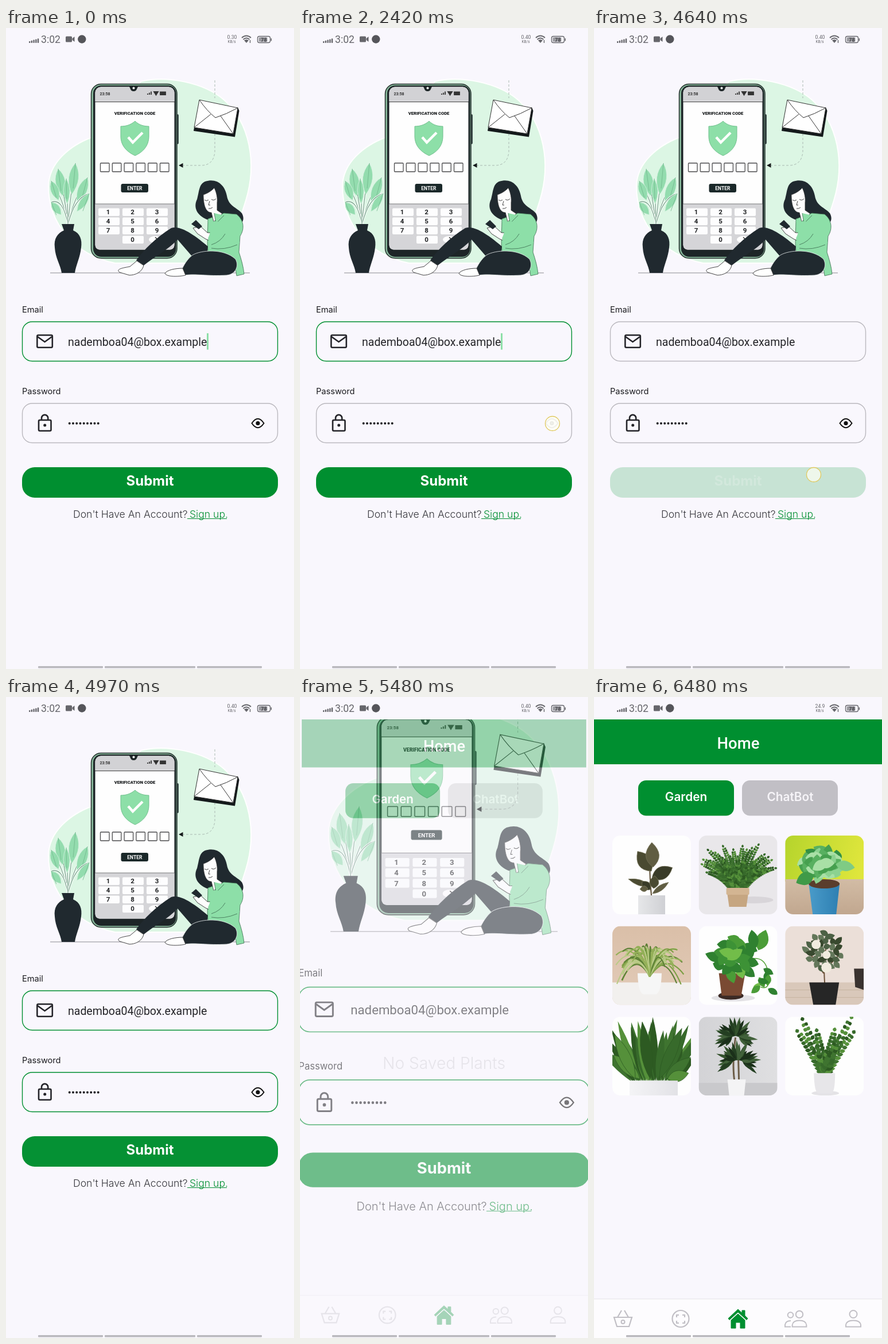
These frames come from a looping animation (502x1115 px, 6670 ms). An HTML page with a canvas:

```html
<!DOCTYPE html>
<html lang="en">
<head>
<meta charset="utf-8">
<title>Plant app login</title>
<style>
html, body { margin: 0; width: 100%; height: 100%; overflow: hidden; background: #f9f7fd; }
canvas { display: block; width: 100vw; height: 100vh; }
</style>
</head>
<body>
<canvas id="stage"></canvas>
<script>
const W = 502, H = 1115, LOOP = 6670;
const BG = '#f9f7fd', GREEN = '#008f30', GRAY = '#c1bfc5', DARK = '#20292f', MINT = '#8ddfa8';
const UI = 'Inter, sans-serif', ROBOTO = 'Roboto, sans-serif';
const EMAIL = 'nademboa04@box.example', PASSWORD = '@dome123$';

const dpr = Math.max(1, window.devicePixelRatio || 1);
const stage = document.getElementById('stage');
const buffer = document.createElement('canvas');
for (const c of [stage, buffer]) { c.width = W * dpr; c.height = H * dpr; }
const main = stage.getContext('2d'), layer = buffer.getContext('2d');
let g = main;

// ---- helpers ----
const clamp = v => Math.min(1, Math.max(0, v));

function paint(p, fill, stroke, lw = 1) {
  if (fill) { g.fillStyle = fill; g.fill(p); }
  if (stroke) { g.strokeStyle = stroke; g.lineWidth = lw; g.stroke(p); }
}
const path = (d, fill, stroke, lw) => paint(new Path2D(d), fill, stroke, lw);
function box(x, y, w, h, r, fill, stroke, lw) {
  const p = new Path2D();
  p.roundRect(x, y, w, h, r);
  paint(p, fill, stroke, lw);
}
function disc(x, y, r, fill, stroke, lw) {
  const p = new Path2D();
  p.arc(x, y, r, 0, 7);
  paint(p, fill, stroke, lw);
}
function oval(x, y, rx, ry, fill) {
  const p = new Path2D();
  p.ellipse(x, y, rx, ry, 0, 0, 7);
  paint(p, fill);
}
function text(s, x, y, font, fill, align = 'left') {
  g.font = font;
  g.fillStyle = fill;
  g.textAlign = align;
  g.fillText(s, x, y);
}
function blend(x0, y0, x1, y1, from, to) {
  const f = g.createLinearGradient(x0, y0, x1, y1);
  f.addColorStop(0, from);
  f.addColorStop(1, to);
  return f;
}
// Cubic bezier easing (0.35, 0.45, 0, 1)
function ease(x) {
  let lo = 0, hi = 1, s = 0.5;
  for (let i = 0; i < 24; i++) {
    s = (lo + hi) / 2;
    if (1.05 * s * (1 - s) ** 2 + s ** 3 < x) lo = s; else hi = s;
  }
  return 1.35 * s * (1 - s) ** 2 + 3 * s * s * (1 - s) + s ** 3;
}
// Opacity of a touched control: drops at once, then eases back
function pressed(t, down, up) {
  if (t < down) return 1;
  const k = clamp((t - up) / 250);
  return 0.2 + 0.8 * k * (2 - k);
}

let seed = 1;
const rnd = () => (seed = seed * 16807 % 2147483647) / 2147483647;
const pick = list => list[Math.floor(rnd() * list.length)];

// ---- foliage; angles are degrees clockwise from straight up ----
function leaf(x, y, deg, len, w, fill, stroke) {
  const a = deg * Math.PI / 180, dx = Math.sin(a), dy = -Math.cos(a);
  const mx = x + dx * len * 0.45, my = y + dy * len * 0.45;
  const p = new Path2D();
  p.moveTo(x, y);
  p.quadraticCurveTo(mx - dy * w, my + dx * w, x + dx * len, y + dy * len);
  p.quadraticCurveTo(mx + dy * w, my - dx * w, x, y);
  paint(p, fill, stroke, 0.8);
}
function tuft(x, y, n, spread, len, w, cols, foot = 0) {
  for (let i = 0; i < n; i++) {
    const u = (i * 7 % n) / (n - 1) * 2 - 1;
    leaf(x + u * foot, y, u * spread + rnd() * 16 - 8, len * (0.5 + 0.5 * rnd()), w, pick(cols));
  }
}
// Leaves spread evenly over an oval, pointing loosely outwards
function scatter(n, x, y, rx, ry, len, w, cols) {
  for (let i = 0; i < n; i++) {
    const out = i * 137.5, b = out * Math.PI / 180, r = Math.sqrt((n - i) / n);
    const deg = out + rnd() * 130 - 65, a = deg * Math.PI / 180, l = len * (0.7 + 0.4 * rnd());
    leaf(x + Math.sin(b) * rx * r - Math.sin(a) * l / 2,
      y - Math.cos(b) * ry * r + Math.cos(a) * l / 2, deg, l, w, pick(cols));
  }
}
function frond(x, y, deg, len, n, size, w, bend, cols) {
  for (let i = 0; i < n; i++) {
    const a = deg * Math.PI / 180, s = size * (1 - 0.6 * i / n);
    leaf(x, y, deg - 50, s, w, pick(cols));
    leaf(x, y, deg + 50, s, w, pick(cols));
    x += Math.sin(a) * len / n;
    y -= Math.cos(a) * len / n;
    deg += bend / n;
  }
  leaf(x, y, deg, size * 0.5, w, pick(cols));
}

// ---- login illustration ----
function drawPhone() {
  box(297, 150, 4, 52, 2, '#3a4a48');
  box(148.5, 97.5, 149.5, 303, 17, '#86b79a', '#27312f', 1.5);
  box(152, 100, 144.5, 298, 14, '#1d2527');
  box(155.5, 102.5, 138, 283, [10, 10, 8, 8], '#fefefe');
  box(155.5, 102.5, 138, 25, [10, 10, 0, 0], '#d2d2d5');
  path('M155 128.5H294', null, '#333', 1.2);
  path('M214 101H231C228 103 229 110 222.500 110C216 110 217 103 214 101Z', '#1d2527');
  disc(222.5, 104.5, 2, '#fff');
  text('23:58', 163.5, 116.5, `bold 7px ${ROBOTO}`, '#333');
  path('M247 116V114M250 116V112.500M253 116V110.500M258 111H265L261.500 116.500ZM269 111.500H278V116H269Z', '#333', '#333', 1.8);
  text('VERIFICATION CODE', 224.5, 151, `900 7.6px ${ROBOTO}`, '#16191b', 'center');
  path('M225 162C217 169 208 171 200 171V188C200 206 212 216 225 222C238 216 249 206 249 188V171C241 171 232 169 225 162Z', MINT, '#6fbf8c', 1);
  path('M213 190L221 199L238 182', null, '#fff', 4.5);
  for (let i = 0; i < 6; i++) box(164.5 + i * 20.8, 235, 15.5, 15, 1, '#fff', '#4a4a4c', 1.3);
  box(200.5, 271, 47.5, 15, 3, '#1a2829');
  text('ENTER', 224.3, 282, `bold 8.500px ${ROBOTO}`, '#fff', 'center');
  box(155.5, 306, 138, 79.5, [0, 0, 8, 8], '#d5d5d8');
  path('M155 306H294', null, '#77787b', 1);
  for (let i = 0; i < 10; i++) {
    const col = i < 9 ? i % 3 : 1, y = 313.5 + Math.floor(i / 3) * 16;
    box(161 + col * 42, y, 37, 13.5, 2, '#fdfdfe');
    text((i + 1) % 10, 178 + col * 42.5, y + 10.8, `bold 11.5px ${ROBOTO}`, '#202224', 'center');
  }
  oval(260, 368, 11, 6, '#fff');
  path('M260 364L268 371M268 364L262 371', null, '#222', 1.4);
}

function drawMail() {
  g.setLineDash([4, 3]);
  path('M364 91V122M364 184V215Q362 239 340 239H309', null, '#a9b9b1', 1);
  g.setLineDash([]);
  path('M301 239L308.500 235V243Z', '#151a1b');
  path('M404 138L406.500 144L399 189.500L327 179L328 173Z', '#14191b');
  path('M337 125L404 139L396 184L328 173Z', '#fff', '#333', 1);
  path('M328 173L357 150M396 184L374 153M337 125Q350 144 365 156Q384 150 404 139', null, '#333', 1);
}

function drawVase() {
  const tips = [[121, 235, 55, 17], [91, 245, 48, 17], [79, 266, 36, 14], [142, 260, 48, 16],
    [145, 288, 38, 12], [79, 303, 28, 13], [105, 262, 44, 11]];
  for (const [x, y, len, w] of tips) {
    const deg = Math.atan2(108 - x, 335 - y) * 180 / Math.PI;
    const stem = `M108 342Q${108 + (x - 108) * 0.3} 295 ${x} ${y}`;
    path(stem, null, '#fff', 3);
    path(stem, null, '#64967a', 1.1);
    leaf(x, y, 180 - deg * 0.9, len, w, '#93dcae', '#d9f2e2');
    path(`M${x} ${y}L${x + (108 - x) * 0.3} ${y + len * 0.8}`, null, '#6fb58b', 0.8);
  }
  path('M97 341H119L117 352C129 357 133 368 131 382C129 400 122 412 120 426H97C95 412 86 400 85 382C83 366 90 357 101 352Z', DARK);
}

function drawReader() {
  path('M347 267C368 260 382 274 385 292C388 310 402 312 411 322C418 334 410 345 402 338L350 333C333 326 326 312 333 298C337 284 336 272 347 267Z', DARK);
  path('M352 332L380 322L402 324C415 334 416 350 408 362L406 390C410 402 414 416 415 428L402 431L398 405L352 388C350 370 352 350 352 332Z', MINT, '#3d6b50', 0.8);
  path('M344 290C351 288 360 282 363 278C367 286 369 296 368 304V317L377 323L362 337L358 321C350 321 344 312 344 290Z', '#fdfdfd', '#333', 0.8);
  path('M346 299Q349 302 353 299M358 298Q362 301 366 297M355 301L353 308H356M353 314Q357 315 360 312', null, '#333', 0.9);
  path('M363 322L366 340L380 326', MINT, '#3d6b50', 0.8);
  path('M288 348C301 344 320 353 352 380L350 397L325 398L299 368C282 386 260 397 240 413L227 404C240 386 262 364 288 348Z', DARK);
  path('M400 402C380 383 340 386 325 395C316 402 310 412 305 423L312 430C330 427 350 432 385 430C402 428 406 412 400 402Z', DARK, '#e9eeee', 0.8);
  path('M228 405L240 413C237 425 225 430 215 430L198 425C190 419 206 417 216 415Z', '#fff', '#444', 1);
  path('M308 418C295 418 280 421 277 427C280 433 300 433 313 430Z', '#fff', '#444', 1);
  path('M381 357L351 356L339 345L326 348L334 358L348 367L379 380L383 370Z', '#fdfdfd', '#333', 0.9);
  path('M323 341L331 334L342 345L336 350Z', DARK);
  path('M352 336Q361 347 352 366L358 383Q381 387 407 374L402 338Z', MINT);
  path('M358 377Q374 372 382 358M358 383Q380 387 403 377', null, '#3d6b50', 0.8);
}

function drawIllustration() {
  path('M150 190C110 205 75 235 74 275C74 340 120 395 190 409H340C390 400 405 340 418 300C438 235 425 165 380 125C345 95 280 82 235 93Z', '#dcf6e4', '#fff', 2);
  path('M77 426H425', null, '#b0afb4', 1.6);
  drawPhone();
  drawMail();
  drawVase();
  drawReader();
}

// ---- login screen ----
function drawEye(open) {
  path('M428.500 687.500Q439 672 449.500 687.500Q439 703 428.500 687.500Z', null, '#111', 2);
  disc(439, 687.5, 3, open ? '#111' : null, '#111', 1.2);
  if (!open) {
    path('M431 678L451 696', null, BG, 2.5);
    path('M429 679L449 697', null, '#111', 2.2);
  }
}

function drawLogin(t) {
  const valid = t >= 4900, focus = t < 2500, shown = t >= 2500 && t < 3580;
  g.fillStyle = BG;
  g.fillRect(-W, -H, W * 3, H * 3);
  drawIllustration();

  text('Email', 28, 495, `14.6px ${UI}`, '#1b1b1f');
  text('Password', 28, 637, `14.6px ${UI}`, '#1b1b1f');
  const line = on => on ? GREEN : '#bab8be';
  box(28.5, 511, 445, 68.5, 17, null, line(valid || focus), 1.4);
  box(28.5, 653, 445, 68.5, 17, null, line(valid), 1.4);

  box(54.3, 534.3, 26.5, 21.5, 2, null, '#242429', 2.6);
  path('M55 537L67.500 546L80 537', null, '#242429', 2.6);
  text(EMAIL, 108, 553, `19.5px ${ROBOTO}`, '#242428');
  const caretOn = t < 430 || (t >= 970 && t < 1480) || t >= 1970;
  if (focus && caretOn) box(350, 531, 3, 28.5, 0, MINT);

  box(57, 682, 21.5, 18.7, 2, null, '#242429', 2.6);
  path('M62 682V678.500A5.600 5.600 0 0 1 73.200 678.500V682', null, '#242429', 2.6);
  disc(67.7, 691, 2.5, '#242429');
  if (shown) text(PASSWORD, 108, 695, `19.5px ${ROBOTO}`, '#242428');
  else for (let i = 0; i < 9; i++) disc(110.7 + i * 6.25, 687.7, 2, '#1c1c20');
  g.globalAlpha = t < 3000 ? pressed(t, 2340, 2500) : pressed(t, 3390, 3580);
  drawEye(!shown);

  g.globalAlpha = pressed(t, 4640, 4760);
  box(28, 764, 446, 53, 22, GREEN);
  text('Submit', 251, 796, `bold 24px ${UI}`, '#fff', 'center');
  g.globalAlpha = 1;

  text("Don't Have An Account?", 117, 852, `300 17.600px ${UI}`, '#36363b');
  text('Sign up.', 320, 852, `300 17.600px ${UI}`, GREEN);
  path('M316 853.500H385', null, GREEN, 1);
}

function drawTouch(t) {
  const dot = (x, y) => disc(x, y, 12.5, 'rgba(255,255,245,.7)', '#e0c95f', 1.3);
  if ((t >= 2340 && t < 2500) || (t >= 3390 && t < 3580)) dot(440, 688);
  if (t >= 4640 && t < 4760) dot(383, 777);
}

// ---- home screen: plant cards in local 137 px squares ----
const dark = ['#243f22', '#33522c', '#1b301a', '#41613a'];
const mid = ['#3f7430', '#55903a', '#2d5a22', '#376a2b'];
const bright = ['#4a9c37', '#72bd49', '#2f8130', '#3d9236'];
const pale = ['#58b060', '#8cd290', '#349044', '#a9e0a6', '#46a04f'];

const plants = [
  () => {
    path('M68 104Q64 60 66 40', null, '#59492f', 2);
    const leaves = [[68, 62, -35, 42, 24], [71, 55, -3, 43, 23], [69, 74, 63, 40, 22], [66, 88, -72, 40, 10],
      [70, 101, 55, 34, 9], [66, 94, -45, 20, 14], [72, 92, 5, 22, 16], [62, 92, -95, 14, 10]];
    leaves.forEach((l, i) => leaf(...l, ['#4a4a31', '#605d42', '#393b28'][i % 3], '#77745a'));
    box(45, 104, 47, 33, 0, blend(45, 0, 92, 0, '#e6e7e9', '#cfd0d4'));
  },
  () => {
    oval(96, 112, 34, 6, '#d8d5d9');
    for (let i = 0; i < 21; i++) {
      const u = (i * 8 % 21) / 10 - 1;
      frond(68 + u * 8, 92, u * 38, 52 + 30 * rnd(), 18, 11, 4, u * 42, mid);
    }
    box(48, 91, 40, 12, 2, '#d3b592');
    path('M50 103H86L83 124H53Z', '#c6a681');
  },
  () => {
    box(0, 0, 137, 80, 0, blend(0, 0, 137, 40, '#b5d42c', '#dfe63c'));
    box(0, 76, 137, 61, 0, blend(0, 76, 0, 137, '#d2bca5', '#c1a78f'));
    path('M41 83H95L89 137H48Z', blend(41, 0, 95, 0, '#4a9bc9', '#2d7fb2'));
    oval(68, 84, 27, 8, '#5a3d2c');
    scatter(34, 64, 49, 34, 22, 30, 18, pale);
    leaf(50, 68, -115, 34, 22, '#3f9a48');
    leaf(88, 50, 100, 34, 18, '#7fcb84');
  },
  () => {
    box(0, 0, 137, 137, 0, blend(0, 0, 0, 98, '#dabfa8', '#e0c8b4'));
    box(0, 98, 137, 39, 0, '#f2f0ee');
    path('M44 82H86Q85 119 74 119H56Q45 119 44 82Z', '#f6f6f6');
    for (let i = 0; i < 70; i++) {
      const u = rnd() * 2 - 1, y = 34 + Math.abs(u) * 66 * rnd() + rnd() * 16;
      path(`M65 88Q${65 + u * 30} ${12 + rnd() * 34} ${65 + u * 60} ${y}`, null,
        pick(['#7d9f45', '#b9cb86', '#5d8036', '#94b058']), 2.2);
    }
  },
  () => {
    oval(60, 125, 38, 6, '#e3e2e5');
    oval(56, 121, 22, 7, '#3b2a25');
    path('M35 82H81L74 121H40Z', '#7a4a33');
    path('M82 60Q118 45 122 88Q124 112 108 106', null, '#5aa43d', 1.6);
    scatter(22, 62, 56, 37, 32, 30, 17, bright);
    leaf(104, 42, 20, 38, 22, bright[0]);
    leaf(98, 40, -10, 34, 18, bright[2]);
    for (let i = 0; i < 8; i++) leaf(102 + rnd() * 22, 74 + i * 5, 90 + rnd() * 150, 20, 11, pick(bright));
  },
  () => {
    box(0, 0, 137, 137, 0, '#ebdfd8');
    box(0, 98, 137, 39, 0, '#d9c8ba');
    path('M0 111H137M0 124H137', null, '#c6b3a2', 1);
    path('M69 100Q66 60 72 34M67 82L45 50M70 75L94 50', null, '#6b5138', 2);
    scatter(32, 68, 44, 33, 32, 17, 10, ['#4c6145', '#63775a', '#39492f']);
    for (const [x, y, r] of [[54, 32, 8], [72, 72, 9], [72, 50, 7]]) disc(x, y, r, '#f1ecdf');
    path('M120 74H137V111L122 106Z', '#39322f');
    path('M42 98H94L88 137H49Z', '#262626');
  },
  () => {
    tuft(70, 113, 34, 34, 114, 13, mid, 36);
    for (const [x, deg, len] of [[48, -48, 62], [40, -25, 85], [92, 50, 58], [82, 24, 96], [66, -8, 100], [96, 75, 38]]) {
      leaf(x, 108, deg, len, 19, pick(mid), '#2d5a22');
    }
    box(30, 111, 84, 26, 0, blend(30, 0, 114, 0, '#f4f4f6', '#e2e2e6'));
  },
  () => {
    box(0, 0, 137, 137, 0, blend(0, 0, 137, 0, '#d3d3d6', '#dfdfe1'));
    box(0, 115, 137, 22, 0, '#c9c9cc');
    path('M62 110Q58 80 64 36M70 110L69 74', null, '#6c5d48', 3);
    tuft(64, 34, 44, 140, 36, 6, dark, 6);
    tuft(68, 76, 44, 135, 36, 6, dark, 8);
    path('M50 109H82L79 137H53Z', '#f4f4f5');
  },
  () => {
    oval(70, 133, 24, 4, '#e4e3e6');
    const stems = [[-21, 98], [-31, 84], [-10, 72], [12, 74], [24, 104], [33, 84], [20, 62]];
    for (const [deg, len] of stems) frond(69, 98, deg, len, 11, 15, 7, deg * 0.15, mid);
    path('M50 98H87Q87 133 80 133H58Q51 133 50 98Z', '#e7e6e9');
  }
];

function drawGrid(t) {
  plants.forEach((plant, i) => {
    const late = i > 1 && i % 3 === 2 || i === 4;
    g.save();
    g.translate(32 + (i % 3) * 150.6, 241 + Math.floor(i / 3) * 157.6);
    const clip = new Path2D();
    clip.roundRect(0, 0, 137, 137, 14);
    g.clip(clip);
    box(0, 0, 137, 137, 0, i === 1 ? '#e9e7ea' : '#fefefe');
    seed = 977 + i * 131;
    if (!late || t >= 5850) plant();
    g.restore();
  });
}

function drawPerson(x, y, k, color) {
  disc(x, y - 8 * k, 6.5 * k, null, color, 2);
  path(`M${x - 13 * k} ${y + 14}V${y + 11}Q${x - 12 * k} ${y + 3} ${x} ${y + 3}Q${x + 12 * k} ${y + 3} ${x + 13 * k} ${y + 11}V${y + 14}Z`, null, color, 2);
}

function drawNav() {
  box(-20, 1047, W + 40, 100, 0, '#fdfcfe');
  path('M-20 1047H522', null, '#e4e2e8', 1.2);
  path('M35 1079H66L61 1095H40ZM41 1079L48 1067M60 1079L53 1067', null, GRAY, 2.2);
  disc(50.5, 1087, 3, null, GRAY, 2);
  disc(151, 1081.5, 14.5, null, GRAY, 2.2);
  path('M144 1079V1075H148M154 1075H158V1079M158 1085V1089H154M148 1089H144V1085', null, GRAY, 2.2);
  path('M251 1065L234 1081L236 1083.500L251 1070L266 1083.500L268 1081L263 1076V1067H258V1071.500Z', GREEN, GREEN, 1);
  path('M251 1073L239 1084V1098H247V1088H255V1098H263V1084Z', GREEN, GREEN, 1);
  drawPerson(358, 1081.5, 0.95, GRAY);
  disc(342.5, 1075, 4.8, null, GRAY, 2);
  path('M343 1095.500H333V1092Q334 1085 343 1085', null, GRAY, 2);
  drawPerson(452, 1081.5, 1, GRAY);
}

function drawHome(t) {
  g.fillStyle = BG;
  g.fillRect(-W, -H, W * 3, H * 3);
  box(0, 0, W, 117, 0, GREEN);
  text('Home', 251.5, 89.5, `500 27.500px ${ROBOTO}`, '#fff', 'center');
  box(77, 145, 167, 61.5, 14, GREEN);
  box(258, 145, 167, 61.5, 14, GRAY);
  text('Garden', 160.5, 180.5, `600 20.800px ${UI}`, '#fff', 'center');
  text('ChatBot', 342, 180.5, `600 20.800px ${UI}`, '#f6f4f8', 'center');
  if (t < 5690) text('No Saved Plants', 251, 648, `300 28.500px ${UI}`, GRAY, 'center');
  else drawGrid(t);
  drawNav();
}

// ---- system bars ----
function drawSystem(t) {
  const c = '#66666b';
  box(0, 0, W, 39, 0, BG);
  for (let i = 0; i < 5; i++) box(40 + i * 3.7, 23 - i * 1.2, 2.4, 3 + i * 1.2, 0.8, c);
  text('3:02', 61, 26, `17.600px ${ROBOTO}`, c);
  box(104, 14.5, 11, 10, 1.5, c);
  path('M115.500 18L119.500 15V24L115.500 21Z', c);
  disc(132.3, 19.5, 7.2, '#55555a');
  const speed = t < 2400 ? '0.30' : t < 5600 ? '0.40' : '24.9';
  text(speed, 394, 19, `8.600px ${ROBOTO}`, c, 'center');
  text('KB/s', 393.5, 26, `6.400px ${ROBOTO}`, c, 'center');
  path('M411 17Q419 10 427 17M413.500 20Q419 15 424.500 20', null, c, 1.9);
  path('M415 21.500Q419 18.500 423 21.500L419 26Z', c);
  path('M425.500 21V26', null, c, 1.4);
  box(438.5, 14.5, 22, 11, 3, null, c, 1.3);
  box(440.5, 16.3, 15, 7.4, 1.5, '#9b9ba0');
  box(461.5, 18, 1.6, 4.5, 0.5, c);
  text('78', 449.5, 23.6, `bold 9px ${ROBOTO}`, '#46464b', 'center');
  for (const [x, w] of [[56, 113], [172, 158], [333, 113]]) box(x, 1110, w, 3.5, 1, '#b9b8bd');
}

// Paints a whole screen, scaled about the centre, with one shared opacity
function show(draw, t, scale, alpha) {
  if (alpha <= 0) return;
  g = layer;
  g.setTransform(dpr * scale, 0, 0, dpr * scale, dpr * (1 - scale) * W / 2, dpr * (1 - scale) * H / 2);
  draw(t);
  g = main;
  g.globalAlpha = alpha;
  g.drawImage(buffer, 0, 0, W, H);
  g.globalAlpha = 1;
}

const start = performance.now();
function frame() {
  const t = (performance.now() - start) % LOOP;
  const p = t < 5355 ? 0 : t >= 5610 ? 1 : ease((t - 5355) / 255);
  const fade = clamp((p - 0.88) / 0.115);
  g = main;
  g.setTransform(dpr, 0, 0, dpr, 0, 0);
  box(0, 0, W, H, 0, BG);
  if (fade < 1) show(drawLogin, t, 1 + 0.15 * p, 1 - 0.5 * fade);
  show(drawHome, t, 0.85 + 0.15 * p, fade);
  drawTouch(t);
  drawSystem(t);
  requestAnimationFrame(frame);
}
frame();
</script>
</body>
</html>
```
